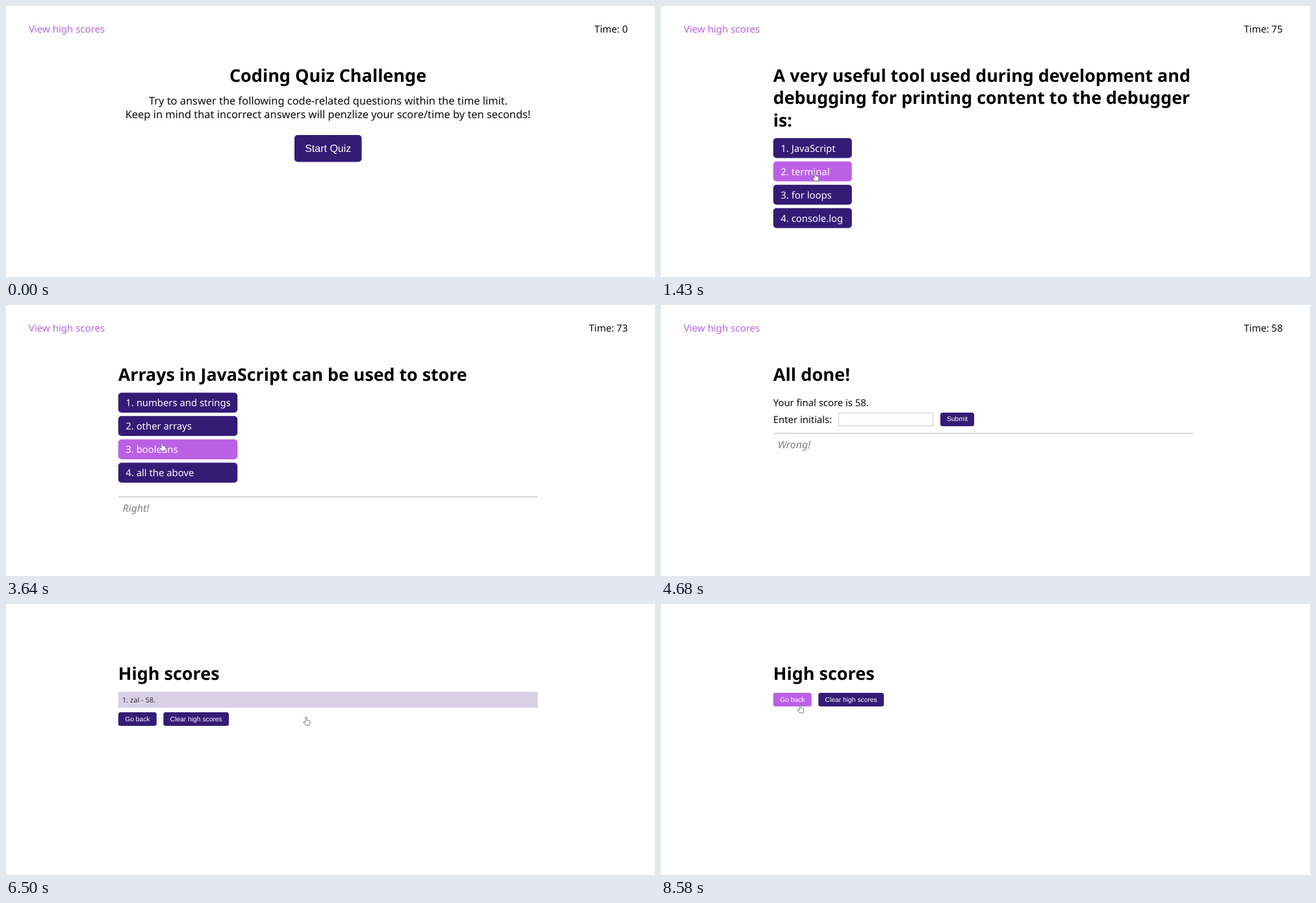
Recreate the animation shown at these times as an HTML page with a canvas. Size 999 px wide and 418 px high, loop 8840 ms.

```html
<!DOCTYPE html>
<html lang="en">
<head>
<meta charset="utf-8">
<title>Coding Quiz Challenge</title>
<style>
  html, body { margin: 0; width: 100%; height: 100%; overflow: hidden; background: #fefefe; }
  canvas { display: block; }
</style>
</head>
<body>
<canvas id="stage" width="999" height="418"></canvas>
<script>
const ctx = document.getElementById('stage').getContext('2d');
const LOOP = 8840, STEP = 130;
const DARK = '#341b75', LIGHT = '#bb60e5', LINK = '#b564de', INK = '#0a0a0a';
const SANS = '"Noto Sans", "Open Sans", sans-serif';
const ARIAL = '"Liberation Sans", Arial, sans-serif';
const LEFT = 172.8, RIGHT = 818.5, MID = 495.5;
const PLAYER = 'zal';

const QUESTIONS = [
  { at: 650, top: 203.8, width: 121,
    title: ['A very useful tool used during development and',
            'debugging for printing content to the debugger', 'is:'],
    choices: ['JavaScript', 'terminal', 'for loops', 'console.log'] },
  { at: 2470, top: 169.2, width: 137.5, verdict: 'Right!',
    title: ['String values must be enclosed within ___ when',
            'being assignedto variables.'],
    choices: ['commas', 'curly brackets', 'quotes', 'parenthesis'] },
  { at: 3250, top: 135.2, width: 183.5, verdict: 'Right!',
    title: ['Arrays in JavaScript can be used to store'],
    choices: ['numbers and strings', 'other arrays', 'booleans', 'all the above'] }
];
const DONE = 3900, VERDICT_END = 4940, TYPING = 5200, SCORES = 6370, CLEARED = 8060;

// Pointer path: time, x, y of its tip
const PATH = [
  [130, 640, 325], [520, 500, 216], [780, 500, 216], [1430, 237, 257],
  [1690, 237, 257], [2080, 226, 324], [2340, 226, 324], [2470, 227, 301],
  [2990, 232, 261], [3380, 232, 261], [3640, 240, 212], [3900, 241, 209],
  [4290, 241, 209], [4680, 330, 172], [5460, 330, 178], [5980, 462, 174],
  [6500, 462, 174], [7150, 300, 174], [7410, 300, 174], [7800, 290, 173],
  [8060, 290, 173], [8580, 214, 155], [8840, 214, 155]
];

let pointer, overButton;

function pointerAt(t) {
  if (t < PATH[0][0] || (t >= 4550 && t < 5590)) return null;
  const i = PATH.findIndex(p => p[0] > t);
  const [t0, x0, y0] = PATH[i - 1], [t1, x1, y1] = PATH[i];
  const k = (t - t0) / (t1 - t0);
  return { x: x0 + (x1 - x0) * k, y: y0 + (y1 - y0) * k };
}

function text(str, x, y, size, { color = INK, style = '', family = SANS, align = 'left' } = {}) {
  ctx.font = `${style} ${size}px ${family}`;
  ctx.fillStyle = color;
  ctx.textAlign = align;
  ctx.fillText(str, x, y);
}

const heading = (str, y, size = 27, x = LEFT, align = 'left') =>
  text(str, x, y, size, { color: '#000', style: 'bold', align });

function box(x, y, w, h, radius) {
  const p = pointer;
  const hot = p && p.x >= x && p.x <= x + w && p.y >= y && p.y <= y + h;
  if (hot) overButton = true;
  ctx.fillStyle = hot ? LIGHT : DARK;
  ctx.beginPath();
  ctx.roundRect(x, y, w, h, radius);
  ctx.fill();
}

function button(label, x, y, w, h, size, base, radius = 3.5) {
  box(x, y, w, h, radius);
  text(label, x + w / 2, y + base, size, { color: '#fff', family: ARIAL, align: 'center' });
}

function verdict(str, y) {
  ctx.fillStyle = '#b4b4b4';
  ctx.fillRect(LEFT, y - 0.5, RIGHT - LEFT, 1);
  text(str, 179.5, y + 22.8, 15.8, { color: '#808080', style: 'italic' });
}

function header(time) {
  text('View high scores', 35, 41, 15, { color: LINK });
  text('Time: ' + time, 957, 41, 15, { align: 'right' });
}

function intro() {
  heading('Coding Quiz Challenge', 117, 27, MID, 'center');
  text('Try to answer the following code-related questions within the time limit.',
    MID + 0.5, 152, 16.4, { align: 'center' });
  text('Keep in mind that incorrect answers will penzlize your score/time by ten seconds!',
    MID, 173, 16.4, { align: 'center' });
  button('Start Quiz', 444, 199, 103.5, 41.5, 16, 26, 5);
}

function question(q) {
  q.title.forEach((line, i) => heading(line, 117 + i * 34.3, 26.8));
  q.choices.forEach((choice, i) => {
    const y = q.top + i * 36;
    box(LEFT, y, q.width, 30.7, 5);
    text(`${i + 1}. ${choice}`, 184.3, y + 21.2, 14.85, { color: '#fff' });
  });
  if (q.verdict) verdict(q.verdict, q.top + 160.8);
}

function done(t) {
  heading('All done!', 117, 27.2);
  text('Your final score is 58.', LEFT, 156, 14.85);
  text('Enter initials:', LEFT, 182, 14.85);
  ctx.strokeStyle = '#cbcbcb';
  ctx.lineWidth = 1;
  ctx.strokeRect(273.5, 166.5, 145, 20);
  const typed = Math.max(0, Math.floor((t - TYPING) / STEP) + 1);
  text(PLAYER.slice(0, typed), 277, 180, 10.4, { family: ARIAL });
  button('Submit', 430, 166, 52, 21, 10.3, 13.3);
  if (t < VERDICT_END) verdict('Wrong!', 198);
}

function scores(t) {
  heading('High scores', 117);
  let y = 137;
  if (t < CLEARED) {
    y = 167;
    ctx.fillStyle = '#d8d1e6';
    ctx.fillRect(LEFT, 135.5, RIGHT - LEFT, 24.5);
    text(`1. ${PLAYER} - 58.`, 179, 151.5, 11, { color: '#333' });
  }
  button('Go back', LEFT, y, 59, 21, 10.3, 14);
  button('Clear high scores', 242.3, y, 100.7, 21, 10.3, 14);
}

const HAND = new Path2D('M-1 1Q0-.8 1 1V5L4.5 6Q6.2 6.5 6 8.5L5 13H-.5L-4 8.8Q-3.8 7-2.4 7.6L-1 9Z');
const ARROW = new Path2D('M0 0V12L2.8 9.5L4.6 13.5L6.3 12.7L4.6 9H8.3Z');

function drawPointer(hand) {
  ctx.save();
  ctx.translate(pointer.x, pointer.y);
  ctx.fillStyle = '#fff';
  ctx.strokeStyle = hand ? '#55506a' : '#222';
  ctx.lineWidth = 0.8;
  const shape = hand ? HAND : ARROW;
  ctx.fill(shape);
  ctx.stroke(shape);
  ctx.restore();
}

function clock(t) {
  if (t < 650) return 0;
  if (t < 1820) return 75;
  if (t < 2860) return 74;
  return t < DONE ? 73 : 58;
}

function draw(t) {
  ctx.fillStyle = '#fefefe';
  ctx.fillRect(0, 0, 999, 418);
  ctx.textRendering = 'geometricPrecision';
  pointer = pointerAt(t);
  overButton = false;

  if (t < SCORES) header(clock(t));
  if (t < QUESTIONS[0].at) intro();
  else if (t < DONE) question(QUESTIONS.filter(q => q.at <= t).pop());
  else if (t < SCORES) done(t);
  else scores(t);

  // The hand lingers briefly after the page changes
  const lingering = t >= SCORES && t <= 6500;
  if (pointer) drawPointer(overButton || lingering);
}

const start = performance.now();
function tick() {
  const t = (performance.now() - start) % LOOP;
  draw(Math.floor(t / STEP) * STEP);
  requestAnimationFrame(tick);
}
tick();
</script>
</body>
</html>
```
